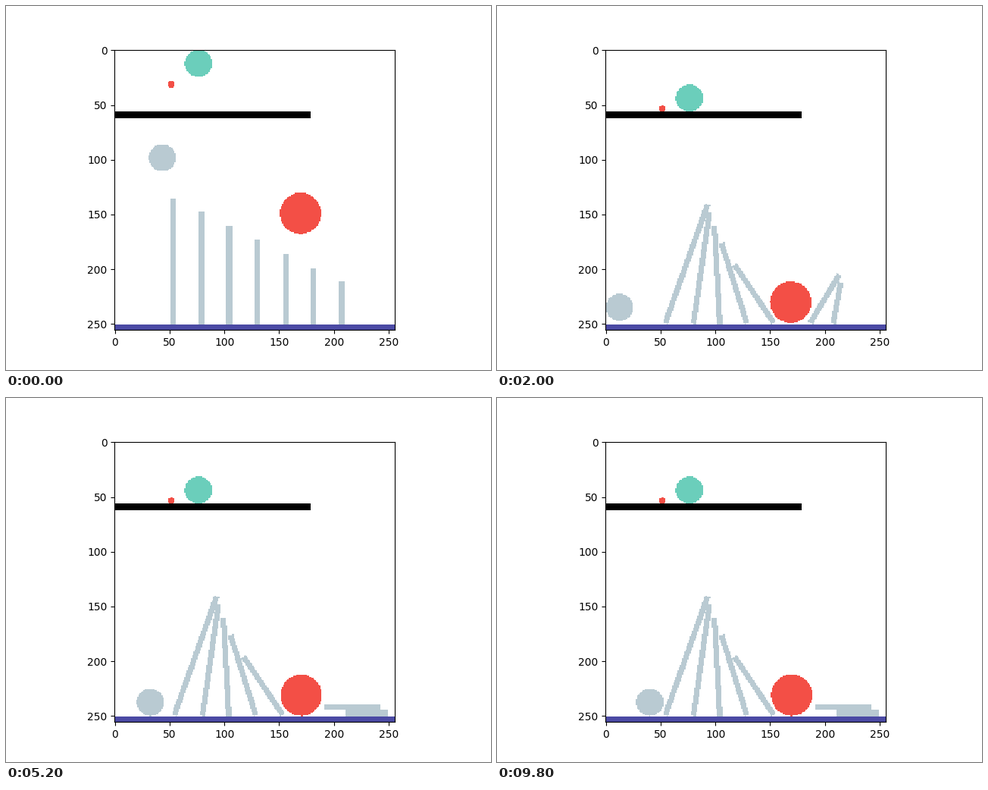
Animation of 640 by 480 pixels, one loop 10000 ms. Source, as a matplotlib script:

```python
import numpy as np
import matplotlib.pyplot as plt
from matplotlib.animation import FuncAnimation

SIZE = 256
FRAMES, INTERVAL = 50, 200
SIM_RATE = 5 / 3          # simulated seconds per second shown
GRAVITY = 58.8            # cells per simulated second squared
RESTITUTION = 0.2

FLOOR = 250.88
SHELF = 57.4
BAR = SIZE / 50
SMALL, MEDIUM, LARGE = 3.1, SIZE / 20, SIZE * 0.075   # ball radii

GREEN = (107, 206, 187)
RED = (243, 79, 70)
GREY = (185, 202, 210)
INDIGO = (75, 74, 164)
BLACK = (0, 0, 0)

YY, XX = np.mgrid[0:SIZE, 0:SIZE] + 0.5

# How each post tips: start and end second, final tilt, slip of the foot,
# easing power, final height above the floor
TIPS = [
    (0.57, 1.80, 19.6, 2.8, 1, 0),
    (1.15, 1.80, 8.2, 7.3, 1, 0),
    (1.55, 1.80, -3.1, 10, 1, 0),
    (0.80, 1.70, -17.6, 4.5, 1, 0),
    (0.52, 1.57, -34, 4.6, 1, 0),
    (0.52, 2.75, 90, 10.4, 2.6, BAR + 0.44),
    (1.80, 2.75, 90, 3.8, 1.4, 0.3),
]


def fall(s, y, rest, v=0.0):
    """Height after s simulated seconds of falling and bouncing."""
    hit = (-v + np.sqrt(v * v + 2 * GRAVITY * (rest - y))) / GRAVITY
    if s < hit:
        return y + v * s + GRAVITY * s * s / 2
    s -= hit
    v = RESTITUTION * (v + GRAVITY * hit)
    while v > 0.5:
        air = 2 * v / GRAVITY
        if s < air:
            return rest - v * s + GRAVITY * s * s / 2
        s -= air
        v *= RESTITUTION
    return rest


def glide(s, x, *legs):
    """Move from x through legs of (end time, speed)."""
    start = 0
    for end, speed in legs:
        x += speed * np.clip(s - start, 0, end - start)
        start = end
    return x


def grey_ball(s):
    x = glide(s, 43.8, (0.955, 0), (2.67, -11), (3.31, -18.8),
              (11, 3.7), (17, -0.14))
    if s < 0.955:
        return x, 99 + GRAVITY * s * s / 2
    return x, fall(s - 0.955, 125.5, FLOOR - MEDIUM, 14.7)


def red_ball(s):
    x = glide(s, 170, (3.33, -0.2), (5.8, 1.95), (10, -1.25), (17, 0.2))
    if s < 0.865:
        return x, 149.8 + GRAVITY * s * s / 2
    if s < 2.333:     # squeezing between two posts
        u = s - 0.865
        return x, 171.6 + 5 * u + 4.5 * u * u
    return x, fall(s - 2.333, 188.6, FLOOR - LARGE, 18.2)


def disc(img, x, y, r, color):
    img[(XX - x) ** 2 + (YY - y) ** 2 <= r * r] = color


def ball(img, x, y, r, color):
    disc(img, x, y, r - 0.35, color)


def box(img, x0, y0, x1, y1, color):
    img[(XX >= x0) & (XX <= x1) & (YY >= y0) & (YY <= y1)] = color


def post(img, k, t):
    start, end, tilt, slip, power, rise = TIPS[k]
    u = np.clip((t - start) / (end - start), 0, 1) ** power
    angle = np.radians(tilt * u)
    sin, cos = np.sin(angle), np.cos(angle)
    length = SIZE * (0.45 - 0.05 * k)
    foot = SIZE * (0.2 + 0.1 * k) + BAR / 2 + slip * sin

    dx = XX - foot
    dy = FLOOR - abs(sin) * BAR / 2 - rise * u ** 8 - YY
    along = dx * sin + dy * cos
    across = dx * cos - dy * sin
    img[(along >= 0) & (along <= length) & (abs(across) <= BAR / 2)] = GREY


def scene(i):
    t = i * INTERVAL / 1000
    s = t * SIM_RATE
    img = np.full((SIZE, SIZE, 3), 255, np.uint8)
    for k in range(len(TIPS)):
        post(img, k, t)
    ball(img, *grey_ball(s), MEDIUM, GREY)
    ball(img, *red_ball(s), LARGE, RED)
    ball(img, 76.8, fall(s, 12.8, SHELF - MEDIUM), MEDIUM, GREEN)
    disc(img, 52, fall(s, 32, SHELF - SMALL), SMALL, RED)
    box(img, 0, SHELF, SIZE * 0.7, SHELF + BAR, BLACK)
    box(img, 0, FLOOR, SIZE, SIZE, INDIGO)
    return img


fig, ax = plt.subplots(figsize=(6.4, 4.8), dpi=100)
view = ax.imshow(scene(0), interpolation="nearest")


def update(i):
    view.set_data(scene(i))
    return [view]


anim = FuncAnimation(fig, update, frames=FRAMES, interval=INTERVAL,
                     repeat=True, repeat_delay=0)
plt.show()
```
